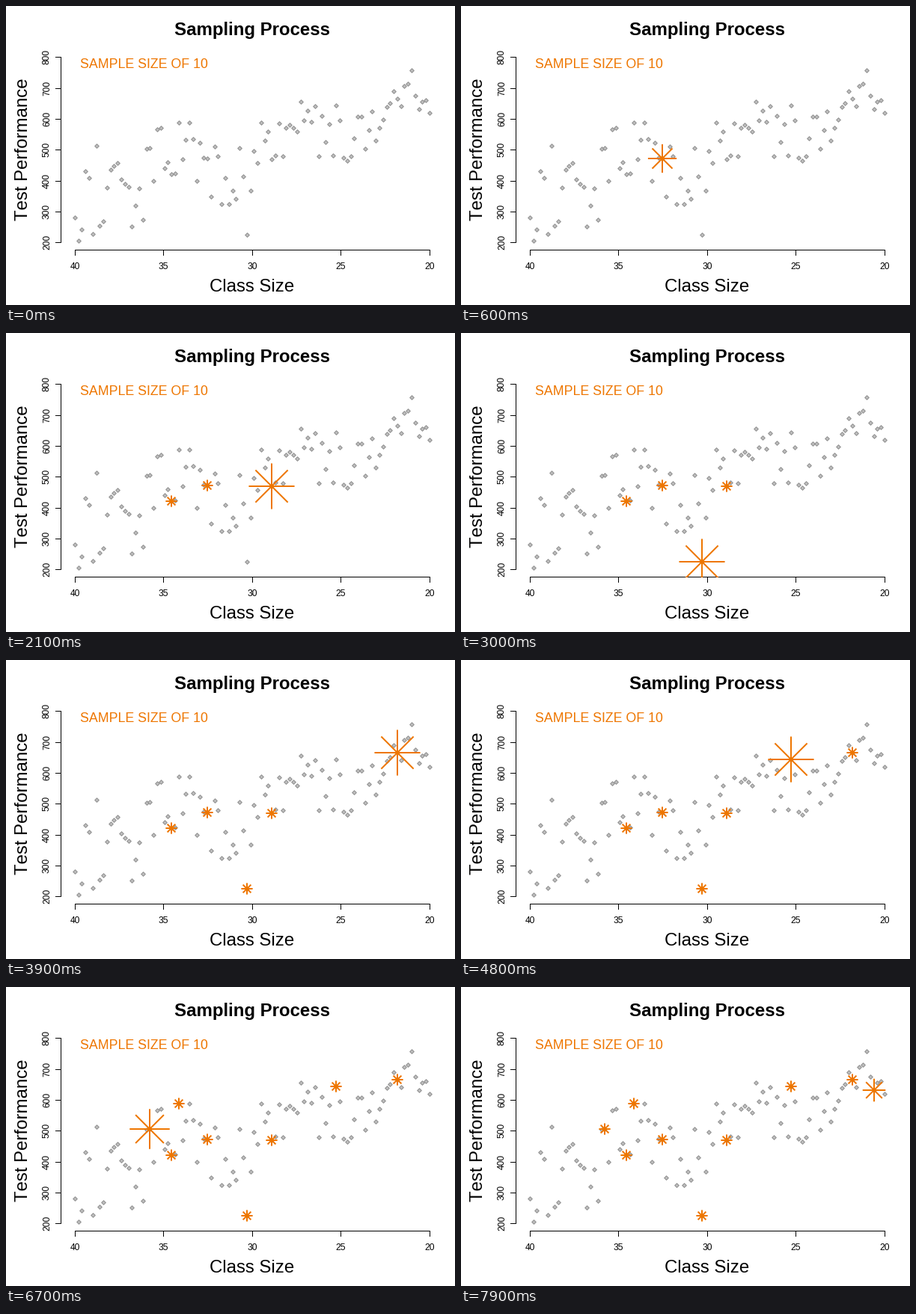
Recreate the animation shown at these times as a matplotlib script. Size 600 px wide and 400 px high, loop 8 s.

```python
import numpy as np
import matplotlib.pyplot as plt
from matplotlib.animation import FuncAnimation
from matplotlib.collections import PatchCollection
from matplotlib.patches import Rectangle, RegularPolygon

plt.rcParams["font.family"] = ["Liberation Sans", "DejaVu Sans"]
plt.rcParams["text.kerning_factor"] = 6

W, H, DPI = 600, 400, 72  # at 72 dpi one point is one pixel
ORANGE = "#ee7600"
COUNT = 100
STEPS = 9  # each star shrinks from size 10 to size 2
FRAMES = 80

# Sampled observations in drawing order: index and height in pixels.
samples = [(37, 204), (27, 225), (55, 205), (48, 306), (90, 124),
           (73, 133), (29, 156), (21, 190), (96, 138)]


def scores():
    """Heights scattered around a rising trend, through the samples."""
    rng = np.random.default_rng(7)
    trend = np.interp(np.arange(COUNT),
                      [0, 20, 30, 45, 60, 75, 85, 94, 99],
                      [265, 225, 205, 235, 150, 180, 155, 95, 160])
    noise = rng.uniform(-1, 1, COUNT) * np.linspace(70, 22, COUNT)
    ys = np.clip(np.round(trend + noise), 73, 314)
    for i, y in samples:
        ys[i] = y
    return ys


xs = np.floor(92.3 + 4.79 * np.arange(COUNT))
ys = scores()

fig = plt.figure(figsize=(W / DPI, H / DPI), dpi=DPI, facecolor="white")
ax = fig.add_axes([0, 0, 1, 1])
ax.set_xlim(0, W)
ax.set_ylim(H, 0)
ax.axis("off")


def rule(x0, y0, x1, y1):
    ax.plot([x0 + 0.5, x1 + 0.5], [y0 + 0.5, y1 + 0.5], color="black", lw=1,
            solid_capstyle="projecting", snap=False)


def label(x, y, text, size, **kw):
    ax.text(x, y, text, fontsize=size, va="baseline",
            **{"ha": "center", "rotation_mode": "anchor", **kw})


def star(cx, cy, size):
    """Four crossing strokes, separated by gaps."""
    r = 3.82 * size
    px, py = [], []
    for angle in np.arange(4) * np.pi / 4:
        dx, dy = r * np.cos(angle), r * np.sin(angle)
        px += [cx - dx, cx + dx, np.nan]
        py += [cy - dy, cy + dy, np.nan]
    return px, py


label(329, 39, "Sampling Process", 24, weight="bold")
label(328.5, 382, "Class Size", 24)
label(29.5, 192, "Test Performance", 24, rotation=90)
label(98.7, 83, "SAMPLE SIZE OF 10", 17.8, ha="left", color=ORANGE)

rule(92, 326, 566, 326)
for k in range(5):
    x = int(92 + 118.5 * k)
    rule(x, 326, x, 333)
    label(x, 352, str(40 - 5 * k), 12)

rule(73, 68, 73, 316)
for k in range(7):
    y = int(316.6 - 41.3 * k)
    rule(66, y, 73, y)
    label(58, y, str(200 + 100 * k), 12, rotation=90)

dots = [RegularPolygon((x + 0.5, y + 0.5), 4, radius=2.8)
        for x, y in zip(xs, ys)]
ax.add_collection(PatchCollection(dots, facecolor="#bfbfbf",
                                  edgecolor="#8f8f8f", linewidth=1,
                                  joinstyle="round"))

stars, = ax.plot([], [], color=ORANGE, lw=2, snap=False,
                 solid_capstyle="butt", zorder=5)
stars.set_clip_path(Rectangle((73, 59), 513, 268, transform=ax.transData))


def draw(frame):
    px, py = [], []
    for k, (i, y) in enumerate(samples):
        step = frame - 1 - STEPS * k
        if step < 0:
            break
        sx, sy = star(xs[i], y, 10 - min(step, STEPS - 1))
        px += sx
        py += sy
    stars.set_data(px, py)
    return stars,


anim = FuncAnimation(fig, draw, frames=FRAMES, interval=100, repeat=True,
                     repeat_delay=0, blit=False)
plt.show()
```
